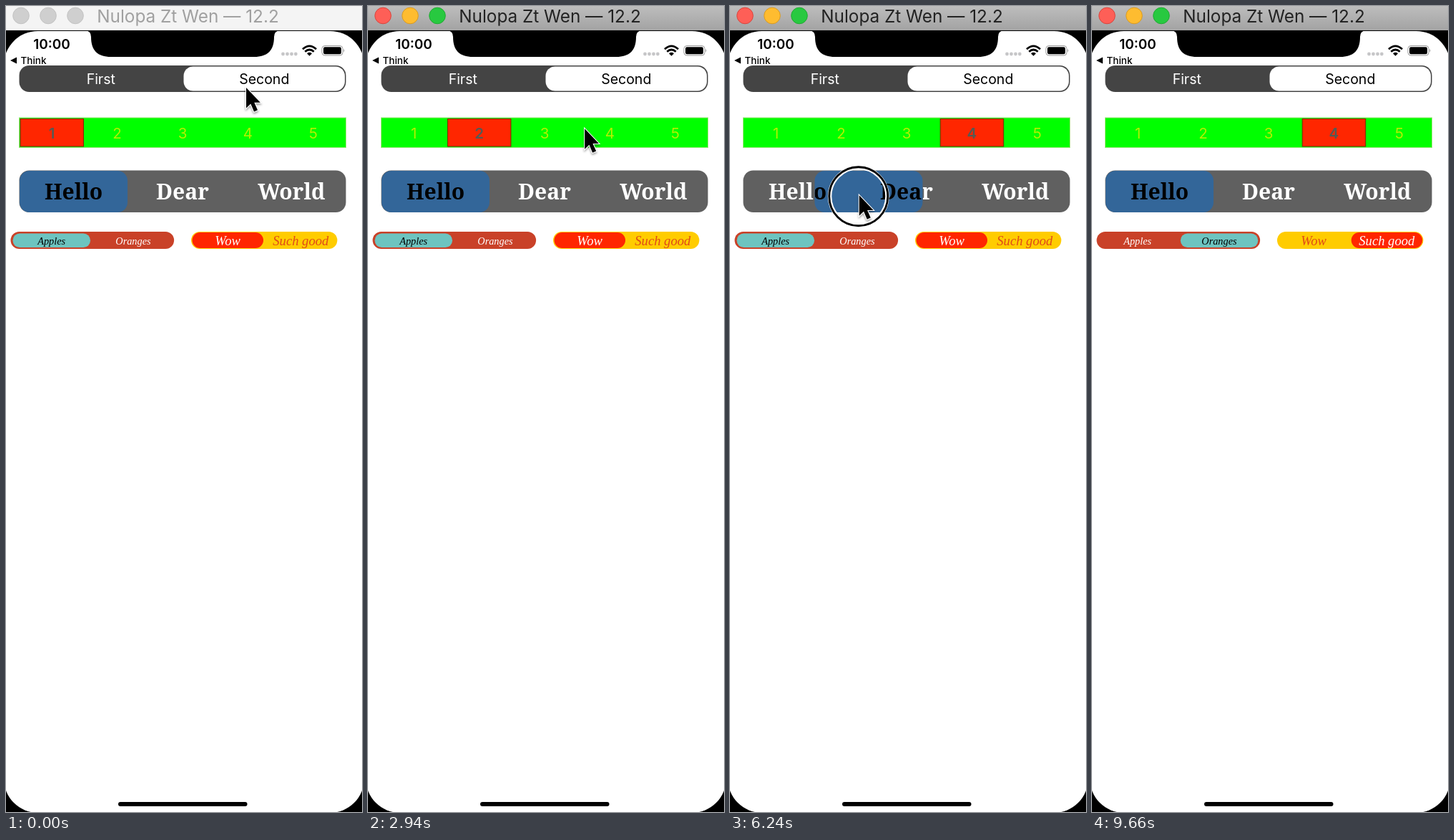
An HTML page that plays this animation: 498 px wide and 1125 px high, repeating every 9.72 s.

```html
<!DOCTYPE html>
<html lang="en">
<head>
<meta charset="utf-8">
<title>Segmented controls</title>
<style>
html, body { margin: 0; width: 100%; height: 100%; overflow: hidden; background: #000; }
svg { display: block; width: 498px; height: 1125px; font-family: Inter, Roboto, sans-serif; }
text { text-anchor: middle; white-space: pre; }
#title { font-size: 24.3px; }
#lights circle { stroke-width: 1; }
</style>
</head>
<body>
<svg id="stage" viewBox="0 0 498 1125" xmlns="http://www.w3.org/2000/svg">
  <defs>
    <linearGradient id="chrome" x1="0" y1="0" x2="0" y2="1">
      <stop offset="0" stop-color="#bdbdbd"/><stop offset="1" stop-color="#a3a3a3"/>
    </linearGradient>
    <filter id="shadow" x="-50%" y="-50%" width="200%" height="200%">
      <feDropShadow dx="0" dy="2" stdDeviation="1.8" flood-opacity=".4"/>
    </filter>
  </defs>
  <rect width="498" height="1125"/>
  <rect id="bar" width="498" height="34"/>
  <g id="lights"><circle cx="21" cy="13.5" r="11.3"/><circle cx="59" cy="13.5" r="11.3"/><circle cx="97" cy="13.5" r="11.3"/></g>
  <text id="title" x="254.5" y="23">Nulopa Zt Wen — 12.2</text>

  <rect x="-3" y="35" width="504" height="1091" rx="47.5" fill="#fff"/>
  <path d="M111 34Q119 35 119 43C119 62 128 71 147 71H347C366 71 375 62 375 43Q375 35 383 34Z"/>
  <text x="64" y="60" font-size="19" font-weight="600">10:00</text>
  <path d="M6 76 15 71.5V80.5Z"/>
  <text x="38.5" y="81" font-size="13.5" font-weight="500">Think</text>
  <g fill="#c6c6c8"><circle cx="387.5" cy="67" r="2.4"/><circle cx="393.5" cy="67" r="2.4"/><circle cx="399.5" cy="67" r="2.4"/><circle cx="405.3" cy="67" r="2.4"/></g>
  <g fill="none" stroke="#000" stroke-width="2.8">
    <path d="M415 60.2Q424.500 51.500 434 60.200M418.300 63.700Q424.500 58.200 430.700 63.700"/>
  </g>
  <path d="M421 66.200Q424.500 63.300 428 66.200L424.500 69.700Z"/>
  <rect x="442" y="55.500" width="29" height="13.500" rx="4" fill="none" stroke="#999"/>
  <rect x="444" y="57.300" width="25" height="10" rx="2.200"/>
  <path d="M472.300 60Q474.500 62.200 472.300 64.500Z" fill="#999"/>
  <g id="controls"></g>
  <rect x="157" y="1111" width="180.500" height="6" rx="3"/>

  <g id="pointer">
    <g id="ring" fill="none">
      <circle cy="1.500" r="40.200" stroke="#fff" stroke-width="5.500"/>
      <circle cy="1.500" r="41" stroke="#000" stroke-width="2.800"/>
    </g>
    <path d="M1 0V28.500L7.300 22.500 12 33.500 17 31.300 12.300 20.700H20.800Z" stroke="#fff" stroke-width="2" paint-order="stroke" filter="url(#shadow)"/>
  </g>
</svg>
<script>
const LOOP = 9720, STEP = 60, ACTIVE_FROM = 660;
const byId = id => document.getElementById(id);
const clamp = (v, lo, hi) => Math.min(hi, Math.max(lo, v));

function add(parent, tag, attrs, text) {
  const el = document.createElementNS('http://www.w3.org/2000/svg', tag);
  for (const key in attrs) el.setAttribute(key, attrs[key]);
  if (text) el.textContent = text;
  parent.append(el);
  return el;
}

// box and thumb: x, y, width, height, corner radius. taps: time, chosen segment.
const slab = { 'font-family': '"Noto Serif", serif', 'font-weight': 700, 'font-size': 30 };
const italic = size => ({ 'font-family': '"Liberation Serif", serif', 'font-style': 'italic', 'font-size': size });
const controls = [
  { labels: ['First', 'Second'], font: { 'font-size': 19.5 }, baseline: 109,
    box: [18.5, 83, 457, 37, 14], fill: '#444', ink: '#fff',
    thumb: [20, 84.5, 225.5, 34, 13], thumbFill: '#fff', thumbInk: '#000',
    start: 1, taps: [[772, 0], [1500, 1]] },
  { labels: ['1', '2', '3', '4', '5'], font: { 'font-size': 20.5 }, baseline: 185,
    box: [18.5, 156, 457, 41.5, 0], fill: '#0f0', ink: '#b4f000', edge: '#8ee66a',
    thumb: [20, 157.5, 88.5, 38.5, 0], thumbFill: '#ff2600', thumbInk: '#555a54', thumbEdge: '#7a2a00', weight: 600,
    start: 0, taps: [[2300, 1], [3240, 3]] },
  { labels: ['Hello', 'Dear', 'World'], font: slab, baseline: 269.5,
    box: [18.5, 229.5, 457, 58.5, 14], fill: '#606060', ink: '#fff',
    thumb: [19, 230, 151, 58, 14], thumbFill: '#336699', thumbInk: '#000',
    start: 0, taps: [[4380, 2], [6780, 0]], drag: { from: 5400, to: 6780, grip: 385, segment: 2 } },
  { labels: ['Apples', 'Oranges'], font: italic(14.3), baseline: 333,
    box: [6.5, 315, 228.6, 24, 12], fill: '#c94128', ink: '#fff',
    thumb: [9.5, 317.5, 108.5, 19.5, 9.75], thumbFill: '#6dc4c0', thumbInk: '#000',
    start: 0, taps: [[7500, 1]] },
  { labels: ['Wow', 'Such good'], font: italic(18.6), baseline: 334,
    box: [259, 315, 204.4, 24, 12], fill: '#ffcc00', ink: '#e04a18',
    thumb: [260.5, 316, 99.5, 22, 11], thumbFill: '#ff2600', thumbInk: '#fff',
    start: 0, taps: [[8100, 1]] },
];

// Time, x, y; the pointer eases from one stop to the next.
const path = [
  [0, 335, 114], [240, 335, 114], [660, 193, 108], [960, 193, 108],
  [1380, 340, 108], [1620, 340, 108], [2160, 155, 172], [2460, 155, 172],
  [3120, 335, 171], [3480, 335, 173], [4200, 400, 270], [4500, 400, 270],
  [5160, 387, 267], [5400, 387, 267], [6740, 85, 263], [6840, 85, 263],
  [7320, 201, 333], [7620, 201, 333], [7980, 420, 335], [8280, 420, 335],
  [9180, 410, 448], [9600, 400, 1135], [9720, 400, 1135],
];

const rect = ([x, y, width, height, rx]) => ({ x, y, width, height, rx });

function build(c, n) {
  const root = byId('controls');
  c.pitch = c.box[2] / c.labels.length;
  const write = (parent, fill, weight) => c.labels.forEach((label, i) => {
    const attrs = { ...c.font, fill, x: c.box[0] + c.pitch * (i + .5), y: c.baseline };
    if (weight) attrs['font-weight'] = weight;
    add(parent, 'text', attrs, label);
  });
  add(root, 'rect', { ...rect(c.box), fill: c.fill, stroke: c.edge || 'none' });
  write(root, c.ink);
  const clip = add(root, 'clipPath', { id: 'clip' + n });
  c.movers = [
    add(clip, 'rect', rect(c.thumb)),
    add(root, 'rect', { ...rect(c.thumb), fill: c.thumbFill, stroke: c.thumbEdge || 'none' }),
  ];
  write(add(root, 'g', { 'clip-path': `url(#clip${n})` }), c.thumbInk, c.weight);
}

function spring(ms) {
  const x = ms * .025, z = .75, d = Math.sqrt(1 - z * z);
  return 1 - Math.exp(-z * x) * (Math.cos(d * x) + z / d * Math.sin(d * x));
}

function pointerAt(t) {
  const i = path.findIndex(p => p[0] > t);
  const [t0, x0, y0] = path[i - 1], [t1, x1, y1] = path[i];
  const u = (t - t0) / (t1 - t0), s = u * u * (3 - 2 * u);
  return [x0 + (x1 - x0) * s, y0 + (y1 - y0) * s];
}

function dragged({ drag, pitch }, x) {
  return clamp(drag.segment + (x - drag.grip) / pitch, 0, drag.segment);
}

function segmentAt(c, t, x) {
  if (c.drag && t >= c.drag.from && t < c.drag.to) return dragged(c, x);
  let place = c.start;
  for (const [when, target] of c.taps) {
    if (t < when) break;
    if (c.drag && when === c.drag.to) place = dragged(c, pointerAt(when)[0]);
    place += (target - place) * spring(t - when);
  }
  return place;
}

const isPressed = t => controls.some(c =>
  c.taps.some(([when]) => t >= when - 120 && t < when) ||
  (c.drag && t >= c.drag.from - 60 && t < c.drag.to));

const lights = [...byId('lights').children];
const lightFills = ['#fe5f57', '#febc30', '#28c940'];
const lightEdges = ['#d9443c', '#d99a20', '#1eaa30'];

function paintWindow(active) {
  byId('bar').setAttribute('fill', active ? 'url(#chrome)' : '#f4f4f4');
  byId('title').setAttribute('fill', active ? '#222' : '#a0a0a0');
  lights.forEach((light, i) => {
    light.setAttribute('fill', active ? lightFills[i] : '#cfcfcf');
    light.setAttribute('stroke', active ? lightEdges[i] : '#c2c2c2');
  });
}

function draw() {
  const t = Math.floor(performance.now() % LOOP / STEP) * STEP;
  const [x, y] = pointerAt(t);
  paintWindow(t >= ACTIVE_FROM);
  for (const c of controls) {
    const left = c.thumb[0] + segmentAt(c, t, x) * c.pitch;
    c.movers.forEach(el => el.setAttribute('x', left));
  }
  byId('pointer').setAttribute('transform', `translate(${x} ${y})`);
  byId('ring').setAttribute('visibility', isPressed(t) ? 'visible' : 'hidden');
  requestAnimationFrame(draw);
}

controls.forEach(build);
draw();
</script>
</body>
</html>
```
